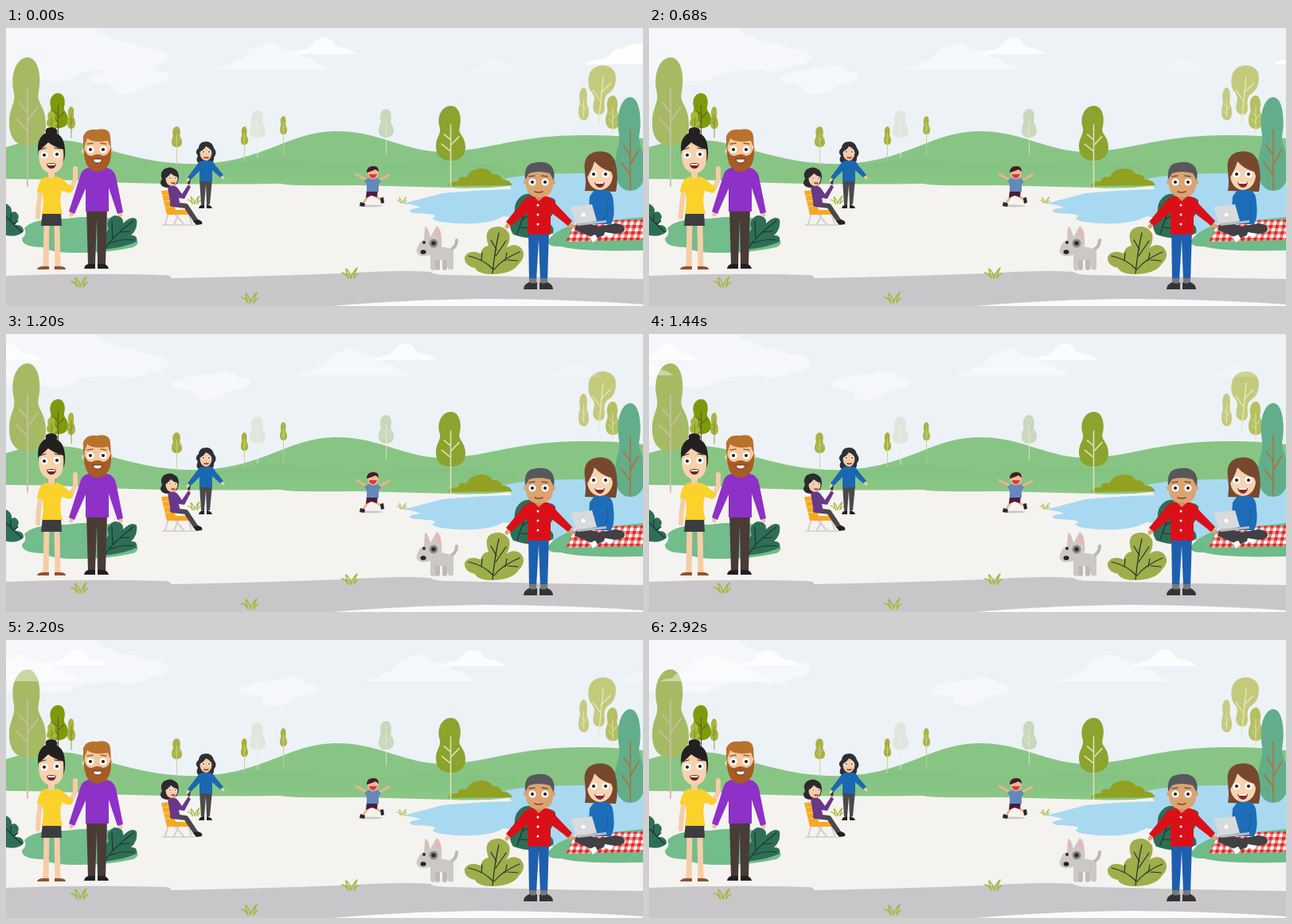
An HTML page that plays this animation: 800x350 px, repeating every 2.96 s.

```html
<!DOCTYPE html>
<html lang="en">
<head>
<meta charset="utf-8">
<title>A day in the park</title>
<style>
html, body { margin: 0; width: 100%; height: 100%; overflow: hidden; background: #ecf2f6; }
svg { display: block; }
.limb { fill: none; stroke-linecap: round; stroke-linejoin: round; }
.vein { fill: none; stroke: #18382f; stroke-width: 1.2; stroke-linecap: round; }
</style>
</head>
<body>
<svg width="800" height="350" viewBox="0 0 800 350">
<defs>
  <g id="eye"><circle r="4.6" fill="#fff"/><circle r="2.1" fill="#222"/></g>
  <path id="tuft" fill="none" stroke="#a4b83c" stroke-width="1.6" stroke-linejoin="round"
    d="M-11-1Q-6-1-2 6Q-5-2-5-6Q0-2 1 6Q4-3 9-7Q6-2 5 6Q8 1 11 0"/>
  <path id="crown" d="M50 0C78 0 90 20 80 40C74 52 100 55 100 76C100 92 78 100 50 100C20 100 0 92 0 74C0 56 20 52 12 38C2 18 22 0 50 0Z"/>
  <g id="pair" fill="#fff">
    <path fill-opacity=".42" d="M264 52Q270 48 279 48Q281 42 292 41Q297 40 301 35Q304 24 318 23Q329 14 342 22Q347 29 358 28Q369 31 373 37Q386 37 390 45Q400 46 405 52Z"/>
    <path fill-opacity=".75" d="M360 33Q365 28 376 27Q381 25 385 21Q389 13 399 12Q409 12 412 20Q417 25 425 25Q434 27 440 33Z"/>
  </g>
  <pattern id="check" width="8" height="8" patternUnits="userSpaceOnUse" patternTransform="skewX(-12)">
    <path fill="#fff" d="M0 0h8v8H0z"/><path fill="#e3332f" fill-opacity=".6" d="M0 0h4v8H0zM0 0h8v4H0z"/><path fill="#dd2826" d="M0 0h4v4H0z"/>
  </pattern>
  <linearGradient id="slope" x2="0" y2="1"><stop stop-color="#82c17f"/><stop offset="1" stop-color="#8bc888"/></linearGradient>
</defs>

<!-- Sky and land -->
<path fill="#ecf2f6" d="M0 0h800v350H0z"/>
<path fill="#f5f7fa" d="M0 0H113Q116 9 130 10Q140 19 163 19Q170 26 187 26Q204 29 204 37Q201 47 182 47Q170 56 151 55Q134 50 122 54Q96 52 84 62Q68 70 48 66Q24 70 0 65Z"/>
<path fill="#88c585" d="M0 150Q35 138 80 142C130 150 160 168 225 171C320 174 350 130 416 130C470 130 500 156 550 156C610 154 640 134 735 135Q770 135 800 139V200H0Z"/>
<path fill="url(#slope)" d="M300 168Q345 162 380 169Q440 176 520 169Q560 166 640 175V202H200Q250 172 300 168Z"/>
<path fill="#f5f3ef" d="M0 190Q60 190 105 193Q200 198 345 196Q350 199 440 198L560 201Q600 203 640 198L800 195V350H0Z"/>
<path fill="#a9d9f1" d="M498 221Q530 213 548 208Q590 204 635 203L626 190Q655 183 715 183Q770 182 800 190V262H690Q660 240 625 237Q606 248 566 246Q534 244 536 239Q548 234 512 233Q498 229 521 226Q512 222 498 221Z"/>
<path fill="#c8c6c9" d="M0 312Q100 308 200 311Q209 312 207 315Q320 313 420 309Q500 304 533 307Q537 311 560 311Q670 314 800 316V350H0Z"/>
<path fill="#fafafa" d="M410 350Q500 342 605 341Q720 342 800 348V350Z"/>
<path fill="#92a122" d="M555 199Q557 192 568 193Q568 186 578 188Q584 176 599 177Q609 178 611 184Q621 183 623 191Q632 190 636 198Z"/>
<path fill="#73bc8b" d="M20 265Q27 259 23 252Q34 239 76 240Q110 235 139 241L158 264Q172 269 160 276Q125 284 82 283Q55 282 46 276Q20 276 20 265Z"/>
<path fill="#6fbb89" d="M681 267Q690 254 715 247L800 238V280Q720 282 697 275Q678 276 681 267Z"/>
<g id="trees"></g>
<path fill="#c4ca7c" d="M750 47Q766 48 766 64Q765 78 756 83Q750 87 752 100Q752 110 744 109Q735 107 738 94Q741 86 734 79Q729 70 733 57Q738 47 750 47Z"/>
<path class="limb" stroke="#e8e8c0" stroke-width="1.3" d="M744 122L750 62M746 91L737 78M747 82L759 70"/>
<g id="lateTrees"></g>

<!-- Shrubs -->
<g fill="#2f6e56">
  <path d="M0 221Q8 225 7 232Q13 229 16 237Q15 244 11 248Q22 247 22 256Q15 264 0 261Z"/>
  <path d="M123 279Q119 264 129 253Q124 241 136 236Q148 236 147 246Q158 235 164 241Q166 253 157 261Q166 261 164 269Q150 276 123 279Z"/>
  <path d="M637 260Q628 246 639 235Q637 218 648 211Q663 203 665 222Q681 207 690 217Q691 236 676 245Q690 247 687 258Q666 270 637 260Z"/>
</g>
<path class="vein" d="M1 238Q9 247 20 257M6 243V234M9 247L15 243M125 277Q134 262 160 243M134 266L133 243M143 257L155 256M131 271Q145 265 160 267M642 259Q650 235 657 217M648 241L684 220M646 251L681 254"/>
<path fill="#9fad4b" d="M608 310Q592 309 589 302Q575 299 576 288Q582 278 596 284Q598 275 606 274Q600 258 609 252Q624 246 632 259Q634 269 628 277Q638 270 646 276Q655 286 644 297Q636 310 608 310Z"/>
<path class="vein" stroke-width="1.5" d="M611 309Q614 279 619 258M616 279L609 267M615 287L628 268M612 304Q600 291 581 287M597 293L598 283M613 304Q623 291 645 282M627 293L629 283M630 292L643 293"/>
<use href="#tuft" x="92" y="320"/><use href="#tuft" x="306" y="340"/><use href="#tuft" x="432" y="309"/>
<use href="#tuft" transform="translate(236 217)scale(.75)"/><use href="#tuft" transform="translate(497 217)scale(.6)"/>

<!-- Couple -->
<g class="limb" stroke="#f5cda6" stroke-width="6">
  <path d="M44 203L41 222L40 238M81 204L87 191L87 177"/>
  <path stroke-width="7" d="M51 248L50 299M64 248L65 299"/>
  <path stroke-width="8" d="M57 180V190"/>
</g>
<path fill="#93522f" d="M39 304Q40 300 47 300H54V304ZM61 304V300H67Q75 300 75 304Z"/>
<path fill="#3c3d40" d="M46 231H69L70 249H44Z"/>
<path fill="#fbd12b" d="M51 187Q57 192 63 187Q70 188 75 194L85 202L80 208L70 205Q66 217 71 234H45Q48 221 46 207H39Q41 189 51 187Z"/>
<path fill="#241f21" d="M50 132Q48 125 57 125Q66 125 64 133Q73 137 74 153Q75 164 71 170L41 160Q37 139 50 132Z"/>
<path fill="#f6d3ae" d="M41 155Q46 151 53 144Q61 150 72 153Q75 182 57 183Q40 181 41 155Z"/>
<use href="#eye" x="48" y="160"/><use href="#eye" x="64" y="159"/>
<path class="limb" stroke="#3b2522" d="M43 153L50 151M61 151L68 152"/>
<path fill="#75231f" d="M51 171Q57 169 63 171Q62 177 57 177Q52 177 51 171Z"/><path fill="#fff" d="M52 171H62L61 173H53Z"/>

<path class="limb" stroke="#f1c196" stroke-width="5" d="M83 230L82 235M143 230L144 235"/>
<path fill="#493b36" d="M101 226H127L125 298H115L114 239L112 298H103Z"/>
<path fill="#231f20" d="M98 303Q99 297 105 297H112V303ZM115 303V297H122Q128 298 129 303Z"/>
<path fill="#8d31c7" d="M103 176H126Q135 177 138 187L147 232L140 234L129 201V231H100V202L86 234L79 231L93 187Q95 178 103 176Z"/>
<path fill="#f4c89e" d="M99 140H130V169H99Z"/><circle cx="98" cy="155" r="3" fill="#f4c89e"/><circle cx="131" cy="154" r="3" fill="#f4c89e"/>
<path fill="#a65c24" d="M98 151Q101 162 108 161Q115 157 122 161Q129 161 132 149Q134 179 115 181Q97 180 98 151Z"/>
<path fill="#b9722c" d="M97 153V136Q101 126 114 128Q130 125 131 136L132 152L128 142Q110 145 102 139Z"/>
<use href="#eye" x="106" y="153"/><use href="#eye" x="122" y="153"/>
<path class="limb" stroke="#a65c24" stroke-width="1.5" d="M102 146L109 145M119 145L126 146"/>
<path fill="#fff" stroke="#6f281d" d="M109 165H121Q120 170 115 170Q110 170 109 165Z"/>

<!-- Friends with a chair -->
<path class="limb" stroke="#d1d0d2" stroke-width="2" d="M204 233L200 247M212 234L223 247M211 247L217 234M229 234L233 246"/>
<path stroke="#bbb" d="M196 248H238"/>
<path fill="#f7a823" d="M195 205L207 204L213 229H231V235H202Z"/>
<path stroke="#ffd071" stroke-width="1.2" d="M197 211L208 210M199 218L210 217M200 225L211 224"/>
<path fill="#2d2a2f" d="M198 178Q207 172 215 180Q219 186 215 196Q204 204 196 199Q192 195 196 190Q193 183 198 178Z"/>
<path class="limb" stroke="#4a484d" stroke-width="6" d="M209 222L226 224L238 242"/>
<path fill="#222" d="M235 243L241 241Q248 243 246 247L239 248Z"/>
<path fill="#683889" d="M203 200Q212 196 216 202L221 209L229 197L232 200L224 215L217 214L219 224H207Z"/>
<ellipse cx="208" cy="190" rx="7.5" ry="9" fill="#f5cba5"/><path fill="#2d2a2f" d="M199 190Q200 178 209 179Q216 182 216 188Q210 186 207 183Q203 188 199 190Z"/>
<use href="#eye" transform="translate(206 189)scale(.4)"/><use href="#eye" transform="translate(213 189)scale(.4)"/>
<path class="limb" stroke="#a32d2b" stroke-width="1.5" d="M208 195Q210 196 212 195"/>
<circle cx="230" cy="196" r="2" fill="#f5cba5"/><path fill="#333" d="M229 189l3 1-1 7-3-1z"/>

<path class="limb" stroke="#f5cba5" stroke-width="3" d="M231 188L228 192M270 186L273 189"/>
<path fill="#4a494c" d="M243 190H259L256 222H252L251 197L249 222H245Z"/>
<path fill="#222" d="M242 227Q243 222 249 222V227ZM252 227V222Q258 223 259 227Z"/>
<path fill="#2d3036" d="M246 144Q258 140 261 151Q266 157 261 163Q262 170 254 171H244Q237 168 241 161Q236 155 242 151Q242 147 246 144Z"/>
<path fill="#1b68b2" d="M247 167H256Q261 168 263 173L273 185L269 188L259 179V193H243V180L232 191L228 188L240 172Q242 168 247 167Z"/>
<ellipse cx="251" cy="157" rx="7.5" ry="10" fill="#f5cba5"/><path fill="#2d3036" d="M243 156Q242 146 251 146Q260 146 259 156Q256 151 251 149Q248 154 243 156Z"/>
<use href="#eye" transform="translate(248 156)scale(.42)"/><use href="#eye" transform="translate(255 156)scale(.42)"/>
<path class="limb" stroke="#a32d2b" stroke-width="1.5" d="M249 163Q251 164 254 163"/>

<!-- Running boy -->
<ellipse cx="458" cy="224" rx="15" ry="1.5" fill="#cac8ca"/>
<g class="limb" stroke="#efb28b" stroke-width="3">
  <path d="M454 192L440 184M468 192L481 185M455 211L449 220M463 211L471 216"/>
</g>
<path fill="#292334" d="M445 219l6 2-1 4-6-1zM470 214l4-1 1 7-4 1z"/>
<path fill="#4d1d3c" d="M453 204H467L466 213L459 211L452 214Z"/>
<path fill="#6488ba" d="M455 189H467L471 193L468 197V206H453V197L450 192Z"/>
<ellipse cx="461" cy="183" rx="7" ry="7.5" fill="#f3b68f"/>
<path fill="#431c2c" d="M453 182Q453 174 461 174Q468 173 468 181L464 178Q457 181 453 182Z"/>
<path fill="#d63d43" d="M456 184H466Q464 190 460 189Q456 188 456 184Z"/>

<!-- Dog -->
<path class="limb" stroke="#bab7b5" stroke-width="4" d="M559 279Q566 275 566 267"/>
<path class="limb" stroke="#bdbab8" stroke-width="6" d="M542 287V302M551 287V302"/>
<path fill="#cbc8c6" d="M533 276Q554 274 562 280V303Q559 306 555 303L553 292H539V304Q536 307 533 303Z"/>
<path fill="#cbc8c6" d="M525 267L526 251Q529 247 533 263L541 249Q547 253 547 266Q549 279 541 282Q531 288 521 287Q514 284 516 278Q520 267 525 267Z"/>
<path fill="#f0b4a8" d="M527 263V253L531 262ZM540 262L541 252Q546 255 545 264Z"/>
<circle cx="537" cy="271" r="5.5" fill="#918c8a"/><circle cx="537" cy="271" r="2.8" fill="#302d2d"/><circle cx="525" cy="270" r="2" fill="#302d2d"/>
<ellipse cx="524" cy="282" rx="3.5" ry="2.7" fill="#252223"/>

<!-- Picnic -->
<path fill="url(#check)" d="M716 243L800 241V267L703 269Z"/>
<path fill="#77482e" d="M727 205Q729 194 727 180Q724 160 740 156Q759 152 765 168Q770 186 766 206Z"/>
<path fill="#1d6db8" d="M739 204H755Q763 207 763 222Q765 237 760 247H735Q731 235 733 212Z"/>
<path class="limb" stroke="#185d9f" d="M755 220Q758 234 750 242"/>
<ellipse cx="746" cy="185" rx="16" ry="19" fill="#f7d3b2"/>
<path fill="#77482e" d="M728 191Q725 162 744 159Q762 158 766 196L760 181Q748 178 739 168Q736 179 728 191Z"/>
<use href="#eye" x="738" y="184"/><use href="#eye" x="753" y="184"/>
<path fill="#8b2927" d="M739 194H752Q751 201 746 201Q741 201 739 194Z"/><path fill="#fff" d="M740 194H751L750 196H741Z"/>
<path fill="#414045" d="M717 248Q728 243 744 250L765 246Q777 247 777 253Q777 260 755 259L737 267L733 262L714 254Z"/>
<path fill="#fff" d="M733 263l7-3 3 5-6 5zM752 257l12 2-4 5-9-3z"/>
<path fill="#d8dadc" d="M709 225L736 222L742 243L716 247Z"/><path fill="#b9bdc0" d="M716 246L754 242V245L718 249Z"/>
<circle cx="725" cy="235" r="2.5" fill="#fff"/>

<!-- Man in red -->
<path class="limb" stroke="#dca372" stroke-width="5" d="M633 246L629 250M705 246L710 249"/>
<path fill="#1d5faf" d="M656 253H682L680 319H671L669 266L666 319H657Z"/>
<path fill="#77797b" d="M657 315H666V322H657ZM671 315H680V322H671Z"/>
<path fill="#333437" d="M650 329Q650 323 657 320Q662 323 667 320V329ZM670 329V320Q675 323 680 320Q687 323 687 329Z"/>
<path fill="#da1019" d="M659 212H680Q687 214 691 222L711 243L706 249L684 232V260H655V232L634 249L628 244L647 221Q651 213 659 212Z"/>
<path fill="#cd9462" d="M663 207H676V212L669 218L663 212Z"/>
<g fill="#fff"><circle cx="668" cy="223" r="1.5"/><circle cx="668" cy="235" r="1.5"/><circle cx="668" cy="247" r="1.5"/></g>
<circle cx="653" cy="194" r="3" fill="#dca372"/><circle cx="687" cy="194" r="3" fill="#dca372"/>
<path fill="#dca372" d="M653 181H687V196Q687 213 670 213Q653 213 653 196Z"/>
<path fill="#57585b" d="M652 191Q650 172 662 170Q678 166 685 174Q690 180 688 192L683 183Q668 179 657 183Z"/>
<use href="#eye" x="661" y="194"/><use href="#eye" x="677" y="194"/>
<path class="limb" stroke="#57585b" stroke-width="1.4" d="M657 187L664 186M673 186L680 187"/>
<path class="limb" stroke="#85432d" stroke-width="1.4" d="M664 206Q669 208 674 206"/>

<g id="clouds">
  <use href="#pair"/><use href="#pair" x="-498"/>
  <path fill="#f5f7fa" d="M106 64Q108 57 121 56Q126 51 140 53Q148 47 157 51Q168 44 179 48Q187 47 188 54Q204 54 206 61Q202 70 184 70Q177 73 173 76Q163 84 149 83Q133 83 135 74Q129 69 118 70Q106 69 106 64Z"/>
  <path fill="#fff" fill-opacity=".9" d="M727 46Q732 40 745 40Q751 38 758 35Q763 25 774 26Q783 19 800 19Q820 16 828 30Q847 32 855 46Z"/>
  <path fill="#fff" fill-opacity=".18" d="M580 54Q587 47 598 46Q603 37 615 37Q626 40 630 46Q641 48 645 54Z"/>
</g>
</svg>
<script>
const byId = id => document.getElementById(id);

// Crown box, colours, foot of the trunk and trunk width
function tree([x, y, w, h, fill, bark, foot, line]) {
  const cx = x + w / 2, at = f => y + h * f;
  const twig = (f, dx, rise) => `M${cx} ${at(f)}L${cx + dx * w} ${at(f - rise)}`;
  return `<use href="#crown" fill="${fill}" transform="translate(${x} ${y})scale(${w / 100} ${h / 100})"/>
    <path class="limb" stroke="${bark}" stroke-width="${line}" d="M${cx} ${at(.35)}V${foot}${
      twig(.62, -.22, .1)}${twig(.72, .28, .16)}${twig(.83, -.3, .13)}"/>`;
}

byId("trees").innerHTML = [
  [306, 104, 20, 34, "#dfe6dc", "#edf0e9", 163, .8],
  [468, 102, 19, 36, "#c9d7bc", "#e3e9d9", 158, .8],
  [4, 37, 46, 111, "#a6ba64", "#c8bea4", 199, 1.8],
  [53, 82, 25, 44, "#7f990d", "#66601d", 140, 1.2],
  [51, 105, 13, 20, "#a7b83c", "#7e862c", 138, .8],
  [77, 99, 10, 28, "#a8b53f", "#7e862c", 138, .8],
  [208, 124, 13, 26, "#a9b144", "#ccd094", 172, .9],
  [295, 124, 9, 23, "#a5b132", "#c6ce84", 168, .9],
  [344, 111, 9, 23, "#aab343", "#c6ce84", 162, .9],
  [540, 98, 37, 69, "#8ca32e", "#dfe1b8", 200, 1.6],
  [719, 75, 13, 41, "#c4ca7e", "#e5e6bd", 112, .9]
].map(tree).join("");
byId("lateTrees").innerHTML = [
  [753, 85, 18, 42, "#b4c061", "#dfe1b0", 132, 1],
  [765, 87, 38, 118, "#62ae8b", "#b1713d", 203, 1.7]
].map(tree).join("");

const LOOP = 2960, STEP = 40, SPEED = .085;
const start = performance.now();
function draw() {
  const t = (performance.now() - start) % LOOP;
  const shift = Math.floor(t / STEP) * STEP * SPEED;
  byId("clouds").setAttribute("transform", `translate(${shift.toFixed(2)} 0)`);
  requestAnimationFrame(draw);
}
draw();
</script>
</body>
</html>
```
